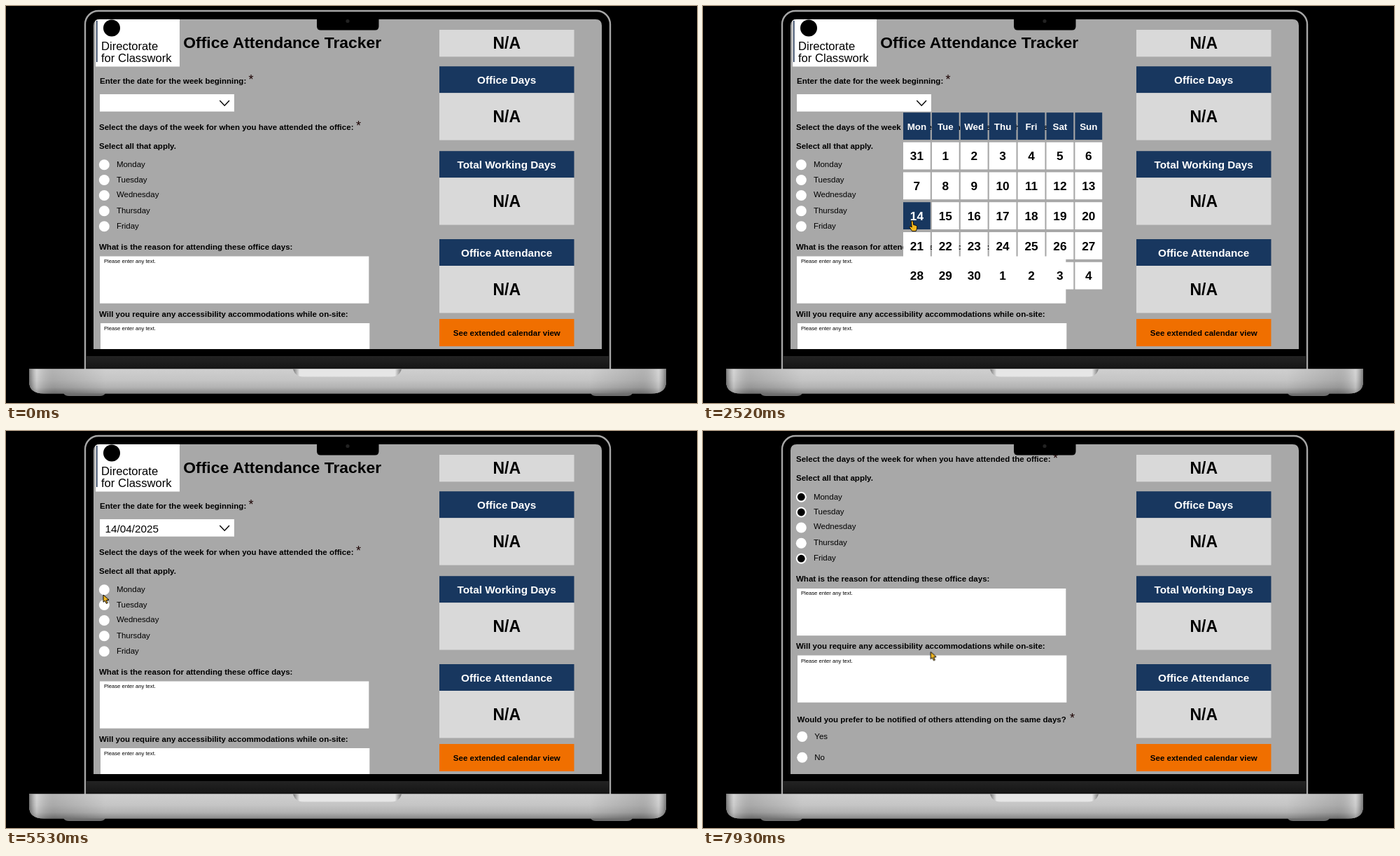
Animation of 987x567 px, one loop 8 s. Source, as an HTML page:

```html
<!DOCTYPE html>
<html lang="en">
<head>
<meta charset="utf-8">
<title>Office Attendance Tracker</title>
<style>
html, body { margin: 0; width: 100%; height: 100%; overflow: hidden; background: #000; }
svg { display: block; width: 987px; height: 567px; font-family: "Liberation Sans", Arial, sans-serif; }
.b { font-weight: bold; font-size: 11.53px; }
.d { font-size: 11.5px; }
.s { font-size: 7.65px; }
.star { font-size: 18px; fill: #1c0303; }
.mid { text-anchor: middle; font-weight: bold; }
.head { font-size: 15.3px; fill: #fff; }
.big { font-size: 23px; }
.wd { font-size: 13.4px; fill: #fff; }
.num { font-size: 17.2px; }

#scroll, #cursor, #hand, #arrow, #click, #cal, #date, .dot, .pick {
  animation: 8s step-end -8ms infinite;
}
#scroll { animation-name: scroll; }
#cursor { animation-name: move; }
#hand { animation-name: hand; }
#arrow { animation-name: arrow; }
#click { animation-name: click; }
#cal { animation-name: cal; }
#date { animation-name: date; }
.dot { animation-name: late; }
.dot.first { animation-name: early; }
rect.pick { animation-name: cell; }
text.pick { animation-name: label; }

@keyframes scroll {
  0% { transform: none; }
  92.5% { transform: translateY(-66px); }
  93.25%, 100% { transform: translateY(-132.5px); }
}
@keyframes move {
  0% { transform: translate(706px, 452px); }
  2.875% { transform: translate(706px, 452px); animation-timing-function: steps(5); }
  7.04% { transform: translate(440px, 150px); animation-timing-function: steps(3); }
  9.54% { transform: translate(350px, 98px); animation-timing-function: steps(3); }
  12.125% { transform: translate(320.5px, 137px); animation-timing-function: steps(4); }
  15.5% { transform: translate(310px, 136.5px); }
  22.9% { transform: translate(310px, 136.5px); animation-timing-function: steps(4); }
  26.25% { transform: translate(289px, 230px); animation-timing-function: steps(3); }
  29% { transform: translate(298.5px, 305.5px); }
  31.5% { transform: translate(299px, 307px); }
  55.17% { transform: translate(299px, 307px); animation-timing-function: steps(5); }
  59.33% { transform: translate(116px, 240px); animation-timing-function: steps(3); }
  62.5% { transform: translate(145px, 208.5px); }
  63.42% { transform: translate(145px, 208.5px); animation-timing-function: steps(5); }
  67.58% { transform: translate(135px, 226px); animation-timing-function: steps(2); }
  69.125% { transform: translate(139px, 234px); }
  75.625% { transform: translate(138.5px, 234px); }
  77.375% { transform: translate(139px, 233px); }
  78.25% { transform: translate(139.5px, 232px); }
  85.8% { transform: translate(139.5px, 232px); animation-timing-function: steps(7); }
  91.625% { transform: translate(325.8px, 315.6px); }
  99.125%, 100% { transform: translate(325.2px, 315.4px); }
}
@keyframes hand {
  0% { visibility: hidden; }
  13.83% { visibility: visible; }
  56% { visibility: hidden; }
  74.875% { visibility: visible; }
  86.625%, 100% { visibility: hidden; }
}
@keyframes arrow {
  0% { visibility: hidden; }
  2.875% { visibility: visible; }
  13.83% { visibility: hidden; }
  56% { visibility: visible; }
  74.875% { visibility: hidden; }
  86.625%, 100% { visibility: visible; }
}
@keyframes click {
  0% { visibility: hidden; }
  19.625% { visibility: visible; }
  21.25% { visibility: hidden; }
  40.25% { visibility: visible; }
  42% { visibility: hidden; }
  81.625% { visibility: visible; }
  83.25%, 100% { visibility: hidden; }
}
@keyframes cal {
  0% { visibility: hidden; }
  21.25% { visibility: visible; }
  56%, 100% { visibility: hidden; }
}
@keyframes date {
  0% { visibility: hidden; }
  56%, 100% { visibility: visible; }
}
@keyframes early {
  0% { visibility: hidden; }
  82.375%, 100% { visibility: visible; }
}
@keyframes late {
  0% { visibility: hidden; }
  83.25%, 100% { visibility: visible; }
}
@keyframes cell {
  0% { fill: #fff; }
  27.3% { fill: #18375f; }
  42% { fill: #8b9baf; }
  42.75% { fill: #fff; }
  50.25% { fill: #8b9baf; }
  51.875%, 100% { fill: #18375f; }
}
@keyframes label {
  0% { fill: #000; }
  27.3% { fill: #fff; }
  42.75% { fill: #000; }
  50.25%, 100% { fill: #fff; }
}
</style>
</head>
<body>
<svg viewBox="0 0 987 567">
  <defs>
    <clipPath id="screen"><path d="M125 490V28Q125 19 134 19H842Q851 19 851 28V490Z"/></clipPath>
    <linearGradient id="metal" x2="0" y2="1">
      <stop offset="0" stop-color="#c9c9c9"/><stop offset=".45" stop-color="#bdbdbd"/>
      <stop offset=".75" stop-color="#a8a8a8"/><stop offset="1" stop-color="#777"/>
    </linearGradient>
    <linearGradient id="edge">
      <stop offset="0" stop-color="#000" stop-opacity=".4"/><stop offset=".012" stop-color="#fff" stop-opacity=".25"/>
      <stop offset=".04" stop-color="#000" stop-opacity=".1"/><stop offset=".12" stop-color="#fff" stop-opacity=".12"/>
      <stop offset=".88" stop-color="#fff" stop-opacity=".12"/><stop offset=".96" stop-color="#000" stop-opacity=".1"/>
      <stop offset=".988" stop-color="#fff" stop-opacity=".25"/><stop offset="1" stop-color="#000" stop-opacity=".4"/>
    </linearGradient>
    <linearGradient id="lip">
      <stop offset="0" stop-color="#777"/><stop offset=".06" stop-color="#e6e6e6"/>
      <stop offset=".94" stop-color="#e6e6e6"/><stop offset="1" stop-color="#777"/>
    </linearGradient>
    <linearGradient id="chin" x2="0" y2="1">
      <stop offset="0" stop-color="#232323"/><stop offset="1" stop-color="#141414"/>
    </linearGradient>
  </defs>

  <rect width="987" height="567"/>
  <rect x="113" y="7" width="750" height="530" rx="19" stroke="#a6a6a6" stroke-width="2.4"/>
  <rect x="115" y="500" width="746" height="19" fill="url(#chin)"/>

  <g clip-path="url(#screen)">
    <rect x="125" y="19" width="726" height="471" fill="#a8a8a8"/>
    <g id="scroll">
      <rect x="128" y="19" width="120" height="67.5" fill="#fff"/>
      <rect x="129" y="21" width="1.5" height="59" fill="#14294a"/>
      <circle cx="151" cy="31.5" r="12"/>
      <g font-size="16.6"><text x="136" y="63">Directorate</text><text x="136" y="80">for Classwork</text></g>
      <text x="253.3" y="60" font-size="22.9" font-weight="bold">Office Attendance Tracker</text>

      <text class="b" x="134" y="110.7">Enter the date for the week beginning:</text>
      <text class="star" x="346.5" y="110.5">*</text>
      <rect x="134" y="126" width="192" height="24.7" fill="#fff"/>
      <path d="M305.3 135L312.2 142.2L319 135" fill="none" stroke="#000" stroke-width="1.4"/>
      <text id="date" x="141.5" y="144.5" font-size="15.3">14/04/2025</text>

      <text class="b" x="133" y="176.6">Select the days of the week for when you have attended the office:</text>
      <text class="star" x="500" y="177">*</text>
      <text class="b" x="133" y="203.6">Select all that apply.</text>
      <g id="days"></g>

      <text class="b" x="133" y="347.6">What is the reason for attending these office days:</text>
      <rect x="134" y="357.5" width="384.3" height="67.2" fill="#fff"/>
      <text class="s" x="140" y="366.7">Please enter any text.</text>
      <text class="b" x="133" y="443.7">Will you require any accessibility accommodations while on-site:</text>
      <rect x="135" y="453" width="384.3" height="67.2" fill="#fff"/>
      <text class="s" x="140" y="463.2">Please enter any text.</text>
      <text class="b" x="134.5" y="548">Would you prefer to be notified of others attending on the same days?</text>
      <text class="star" x="524" y="548.5">*</text>
      <g id="answers"></g>
    </g>
    <g id="cal"></g>
    <g id="cards"></g>
    <rect x="619" y="447" width="192.5" height="39" fill="#f06f00"/>
    <text class="b" x="715.3" y="470.5" text-anchor="middle">See extended calendar view</text>
  </g>

  <path d="M444 17H532.5V29Q532.5 34.5 527 34.5H449.5Q444 34.5 444 29Z"/>
  <circle cx="488" cy="21.5" r="2.6" fill="#222"/>

  <path d="M82 553H142Q140 557 134 557H90Q84 557 82 553ZM835 553H895Q893 557 887 557H843Q837 557 835 553Z" fill="#6e6e6e"/>
  <g id="base">
    <path id="slab" d="M33 518.5H943V536Q943 553.5 922 553.5H54Q33 553.5 33 536Z" fill="url(#metal)"/>
    <use href="#slab"/>
    <path d="M33 518.5H943V536Q943 553.5 922 553.5H54Q33 553.5 33 536Z" fill="url(#edge)"/>
    <path d="M410 518.5H565Q562 529.5 550 529.5H425Q413 529.5 410 518.5Z" fill="url(#lip)"/>
  </g>

  <g id="cursor">
    <circle id="click" r="8.2" fill="#fff000" opacity=".65"/>
    <path id="hand" fill="#f5b81e" stroke="#000" stroke-width=".9" stroke-linejoin="round"
      d="M-1.6 1Q-1.5 -.2 -.3 -.2Q.9 -.2 1.1 1L1.7 5.5L5 6.3Q7 6.9 6.8 8.7L6.4 11.5L5.2 14.6H-.2L-3.8 9.6Q-4.4 8.2 -3.2 7.8Q-2 7.7 -.8 9Z"/>
    <path id="arrow" fill="#f5b81e" stroke="#000" stroke-linejoin="round"
      d="M0 0V10.3L2.4 8.3L4.3 12.4L6.2 11.6L4.4 7.6L8 7.2Z"/>
  </g>
</svg>
<script>
const fill = (id, parts) => document.getElementById(id).innerHTML = parts.join('');
const box = (x, y, w, h, color, cls = '') =>
  `<rect class="${cls}" x="${x}" y="${y}" width="${w}" height="${h}" fill="${color}"/>`;
const text = (cls, x, y, s) => `<text class="${cls}" x="${x}" y="${y}">${s}</text>`;
const radio = (x, y, label, base, dot) =>
  `<circle cx="${x}" cy="${y}" r="7.5" fill="#fff"/>` +
  (dot ? `<circle class="${dot}" cx="${x}" cy="${y}" r="5.4"/>` : '') +
  text('d', x + 17.6, base, label);

fill('days', [
  radio(140.3, 226.7, 'Monday', 230, 'dot first'),
  radio(140.3, 248.5, 'Tuesday', 251.6, 'dot'),
  radio(140.3, 270.5, 'Wednesday', 272.8),
  radio(140.3, 292.7, 'Thursday', 295.8),
  radio(140.3, 314.7, 'Friday', 317.8, 'dot')
]);
fill('answers', [radio(141.7, 568.9, 'Yes', 572.8), radio(141.7, 598.8, 'No', 602.5)]);

const navy = '#18375f', grey = '#d9d9d9', cx = 715.2;
const card = (title, y) => box(619, y, 192.5, 38.2, navy) + box(619, y + 38, 192.5, 67.4, grey) +
  text('mid head', cx, y + 24.6, title) + text('mid big', cx, y + 80, 'N/A');
fill('cards', [
  box(619, 34, 192.5, 38.4, grey), text('mid big', cx, 61, 'N/A'),
  card('Office Days', 86.2), card('Total Working Days', 207.2), card('Office Attendance', 333)
]);

const cells = ['Mon', 'Tue', 'Wed', 'Thu', 'Fri', 'Sat', 'Sun'].map((day, i) =>
  box(286 + i * 40.9, 152.2, 38.8, 38.8, navy) + text('mid wd', 305.4 + i * 40.9, 176.7, day));
for (let i = 0; i < 35; i++) {
  const x = 286 + i % 7 * 40.9, y = 194.6 + Math.floor(i / 7) * 42.8;
  const pick = i === 14 ? 'pick' : '';
  cells.push(box(x, y, 38.8, 38.8, '#fff', pick),
    text('mid num ' + pick, x + 19.4, y + 25.6, i ? (i - 1) % 30 + 1 : 31));
}
fill('cal', cells);
</script>
</body>
</html>
```
